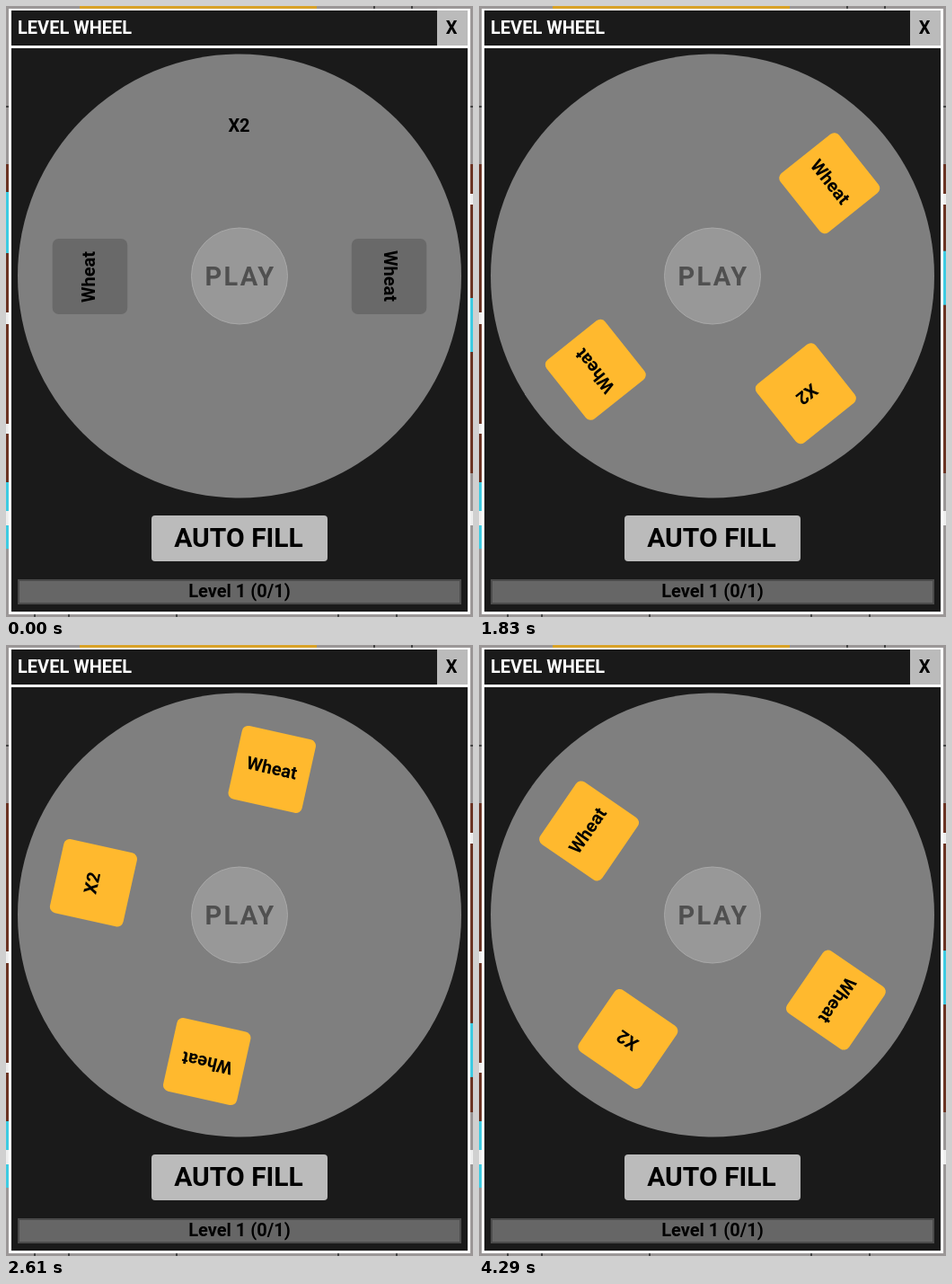
Write an HTML page that moves like this. It is 520 by 680 pixels and loops after 4.38 s.

```html
<!DOCTYPE html>
<html lang="en">
<head>
<meta charset="utf-8">
<title>Level wheel</title>
<style>
html, body { margin: 0; width: 100%; height: 100%; overflow: hidden; background: #999; }
svg { display: block; width: 520px; height: 680px; }
text { font: 700 20px Roboto, Arial, sans-serif; text-anchor: middle; }
.big { font-size: 30px; }
.play { font-size: 29px; letter-spacing: 2.2px; }
</style>
</head>
<body>
<svg viewBox="0 0 520 680">
  <!-- scenery showing around the panel -->
  <rect width="520" height="680" fill="#9b9797"/>
  <path d="M82 0H346V4H82Z" fill="#d9a227"/>
  <path d="M410 0v4M452 0v4M32 676v4M70 676v4M190 676v4M370 676v4M435 676v4M0 112h4M516 112h4" stroke="#444" stroke-width="2"/>
  <path d="M0 176H4V530H0ZM516 176H520V520H516Z" fill="#6b3323"/>
  <path d="M0 530H4V604H0Z" fill="#3ecbe2"/>
  <path d="M0 341h4v13H0ZM0 465h4v11H0ZM0 562h4v16H0ZM516 209h4v12h-4ZM516 562h4v16h-4Z" fill="#eee"/>
  <rect id="leftCargo" y="207" width="4" height="68" fill="#3ecbe2"/>
  <rect id="rightCargo" x="516" width="4" height="60" fill="#3ecbe2"/>

  <path d="M3 3H517V677H3Z" fill="#fff"/>
  <path d="M6 5H514V44H6ZM6 47H514V674H6Z" fill="#1a1a1a"/>
  <path d="M480 5H514V44H480Z" fill="#bbb"/>
  <text x="13" y="31" fill="#fff" style="text-anchor:start">LEVEL WHEEL</text>
  <text x="496" y="31">X</text>

  <circle cx="260" cy="300.5" r="247" fill="#7f7f7f"/>
  <g id="wheel"></g>
  <circle id="knob" cx="260" cy="300.5" r="53.500"/>
  <text id="play" class="play" x="261" y="311">PLAY</text>

  <rect id="fill" x="162" y="567" width="196" height="51" rx="4"/>
  <text class="big" x="259" y="602">AUTO FILL</text>
  <rect x="14" y="639" width="492" height="26" fill="#666" stroke="#4b4b4b" stroke-width="2"/>
  <text x="260" y="658">Level 1 (0/1)</text>
  <path id="cursor" d="M0 0V16.500L4 13L6.600 19L9.300 17.800L6.700 12H12Z" fill="#fff" stroke="#111"/>
</svg>
<script>
const LOOP = 4380, STEP = 30;
const PRESS = 660, FILLED = 690, LEAVE = 1260, GONE = 1740;
const SPIN = 1259, SPIN_TIME = 2511, TURN = 9 * 360 + 214.4;
const $ = id => document.getElementById(id);
const set = (el, attrs) => { for (const k in attrs) el.setAttribute(k, attrs[k]); };
const show = on => ({ visibility: on ? 'visible' : 'hidden' });
const progress = (t, from, length) => Math.min(1, Math.max(0, (t - from) / length));
const easeOut = u => 1 - (1 - u) ** 3.2;

$('wheel').innerHTML = ['Wheat', 'X2', 'Wheat'].map((label, i) =>
  `<g transform="rotate(${90 * (i - 1)}) translate(0 -166.5)">
    <rect x="-42" y="-41.8" width="84" height="83.5" rx="7"/><text x="-.5" y="5.3">${label}</text>
  </g>`).join('');
const tiles = [...$('wheel').querySelectorAll('rect')];

// Pointer stops: screen edge, fill button, play button, screen edge
const edge = [522, 420], fillSpot = [270, 585], playSpot = [254, 311], exit = [522, 61];

function pointer(t) {
  const [a, b, u] = t < PRESS ? [edge, fillSpot, progress(t, 60, 390)]
    : t < LEAVE ? [fillSpot, playSpot, progress(t, PRESS, 270)]
    : [playSpot, exit, progress(t, LEAVE, GONE - LEAVE)];
  return a.map((from, i) => from + (b[i] - from) * u);
}

function draw(now) {
  const t = Math.floor(now % LOOP / STEP) * STEP;
  const filled = t >= FILLED, ready = filled && t < SPIN;
  const angle = TURN * easeOut(progress(t, SPIN, SPIN_TIME));

  set($('wheel'), { transform: `translate(260 301) rotate(${angle})` });
  tiles.forEach((tile, i) => set(tile, { fill: filled ? '#ffb92e' : i == 1 ? 'none' : '#696969' }));
  set($('knob'), { fill: ready ? '#bbb' : '#989898', stroke: ready ? '#d2d2d2' : '#a8a8a8' });
  set($('play'), { fill: ready ? '#000' : '#505050' });
  set($('fill'), { fill: t >= PRESS && t < PRESS + 90 ? '#a8a8a8' : '#bbb' });
  set($('cursor'), { transform: `translate(${pointer(t)})`, ...show(t > 60 && t < GONE) });
  set($('rightCargo'), { y: 120 + (205 + 0.19 * t) % 400 });
  set($('leftCargo'), show(t < 300));
}

const start = performance.now();
function loop() {
  draw(performance.now() - start);
  requestAnimationFrame(loop);
}
loop();
</script>
</body>
</html>
```
